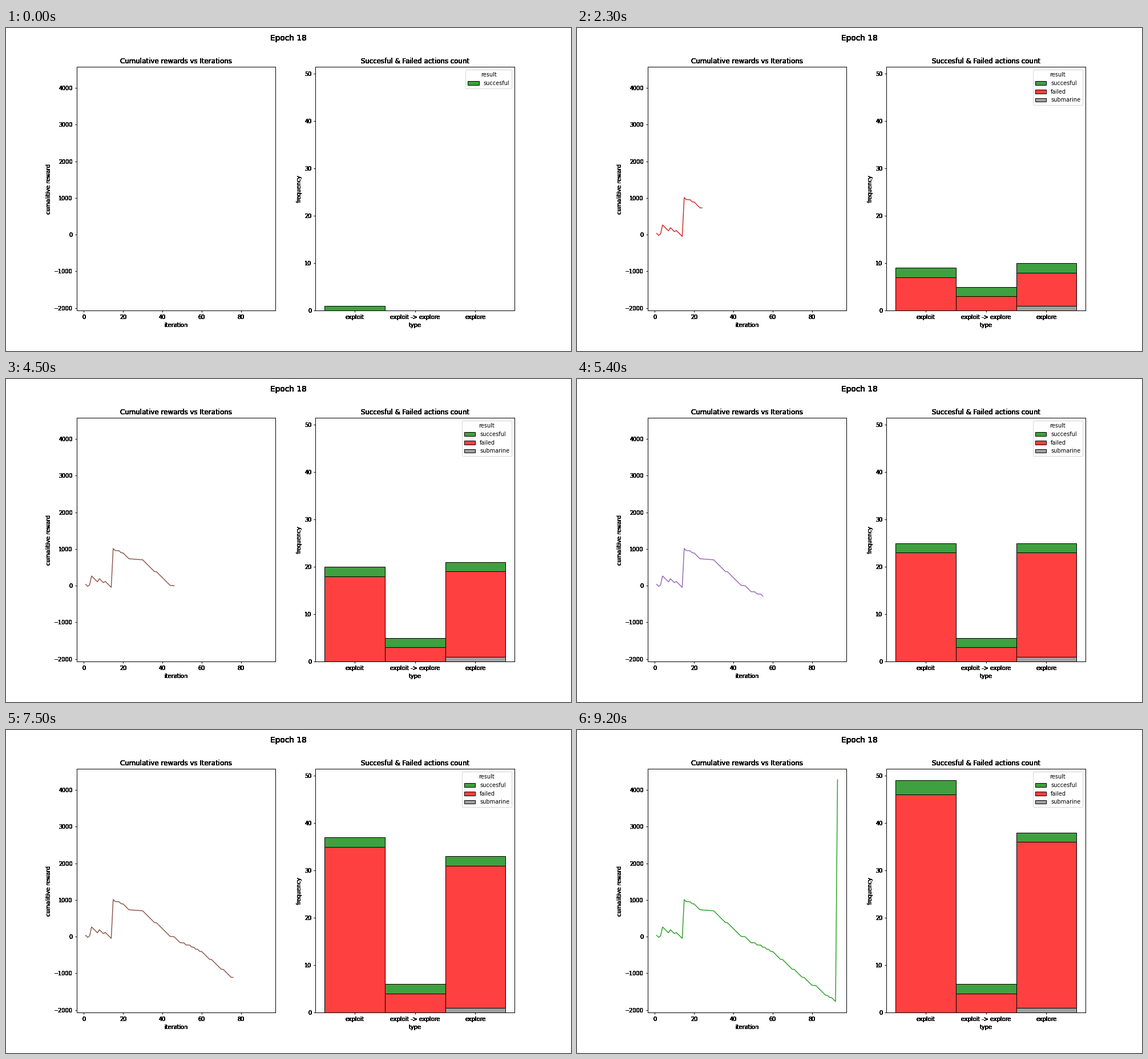
Animation, 990 px wide and 566 px high, one loop 9.3 s. Source, as a matplotlib script:

```python
import matplotlib.pyplot as plt
import numpy as np
from matplotlib.animation import FuncAnimation
from matplotlib.colors import to_rgba

W, H = 990, 566
DPI = W / 14  # a 14 inch wide layout, so every point size scales with the stage
STEPS, INTERVAL = 93, 100
PASSES = 12  # labels outside the axes look overprinted

plt.rcParams.update({
    "font.family": "DejaVu Sans", "font.size": 10,
    "axes.linewidth": 72 / DPI,
    "xtick.major.width": 72 / DPI, "ytick.major.width": 72 / DPI,
})

TYPES = ["exploit", "exploit -> explore", "explore"]
RESULTS = ["succesful", "failed", "submarine"]
COLORS = ["green", "red", "gray"]

# One letter per action: x = exploit, m = exploit -> explore, e = explore
ACTIONS = ("xxemmxeemxxmexm" "exeexeexexeexexe" "xx" "exexexexexexe" "xexex"
           "xexemxexex" "ee" "xxexxxex" "xexex" "xxexx" "xxexxexxex" "ex")
SUCCESSES = {1, 3, 4, 8, 11, 15, 93}
SUBMARINE = 24

# Reward changes: an opening phase, then alternating runs of big and small losses
BIG, SMALL = -53.5, -4
OPENING = [36, BIG, 40, 243, BIG, BIG, BIG, 86, BIG, BIG, 31, BIG, BIG, BIG, 1059]
RUNS = [1, 2, 1, 1, 3, 7, 6, 1, 7, 2, 3, 2, 1, 2, 1, 1, 1,
        1, 1, 1, 4, 1, 5, 1, 4, 1, 4, 2, 5, 1, 1, 1, 2]
FINAL = 4279


def reward_curve():
    losses = np.repeat([SMALL if i % 2 else BIG for i in range(len(RUNS))], RUNS)
    return np.append(np.cumsum(np.concatenate([OPENING, losses])), FINAL)


def count_history():
    """Counts by step, result and action type."""
    hits = np.zeros((STEPS, len(RESULTS), len(TYPES)), dtype=int)
    for step, action in enumerate(ACTIONS, 1):
        result = 0 if step in SUCCESSES else 2 if step == SUBMARINE else 1
        hits[step - 1, result, "xme".index(action)] = 1
    return hits.cumsum(axis=0)


def overprint(text):
    draw = text.draw

    def draw_repeatedly(renderer):
        for _ in range(PASSES):
            draw(renderer)

    text.draw = draw_repeatedly


def label_axes(ax, title, xlabel, ylabel):
    ax.set_title(title, fontsize=12)
    ax.set_xlabel(xlabel)
    ax.set_ylabel(ylabel)
    labels = [ax.title, ax.xaxis.label, ax.yaxis.label]
    for axis in (ax.xaxis, ax.yaxis):
        labels += [tick.label1 for tick in axis.get_major_ticks()]
    for label in labels:
        overprint(label)


steps = np.arange(1, STEPS + 1)
rewards = reward_curve()
counts = count_history()

# The tiny surplus keeps the pixel size from rounding down
fig, (left, right) = plt.subplots(
    1, 2, figsize=((W + 0.01) / DPI, (H + 0.01) / DPI), dpi=DPI, facecolor="white")
fig.subplots_adjust(left=0.125, right=0.9, bottom=0.125, top=0.88, wspace=0.201)
overprint(fig.suptitle("Epoch 18", fontsize=14))

pad = 0.05 * (rewards.max() - rewards.min())
left.set_xlim(-3.6, 97.6)
left.set_ylim(rewards.min() - pad, rewards.max() + pad)
left.set_xticks(range(0, 81, 20))
left.set_yticks(range(-2000, 4001, 1000))
label_axes(left, "Cumulative rewards vs Iterations", "iteration", "cumalitive reward")
line, = left.plot([], [], lw=1.5)

right.set_xlim(-0.65, 2.65)
right.set_ylim(0, 49 * 1.05)
right.set_xticks(range(3), TYPES)
right.set_yticks(range(0, 51, 10))
label_axes(right, "Succesful & Failed actions count", "type", "frequency")
bars = [right.bar(range(3), [0] * 3, width=1, facecolor=to_rgba(color, 0.75),
                  edgecolor="black", linewidth=72 / DPI) for color in COLORS]


def update(i):
    line.set_data(steps[:i + 1], rewards[:i + 1])
    line.set_color(f"C{i % 10}")

    base = np.zeros(len(TYPES))
    for group, heights in zip(bars[::-1], counts[i][::-1]):
        for bar, y, height in zip(group, base, heights):
            bar.set_y(y)
            bar.set_height(height)
        base += heights

    seen = [k for k in range(len(RESULTS)) if counts[i, k].any()]
    right.legend([bars[k] for k in seen], [RESULTS[k] for k in seen],
                 title="result", loc="upper right")


anim = FuncAnimation(fig, update, frames=STEPS, interval=INTERVAL,
                     init_func=lambda: update(0), repeat=True, repeat_delay=0)
plt.show()
```
